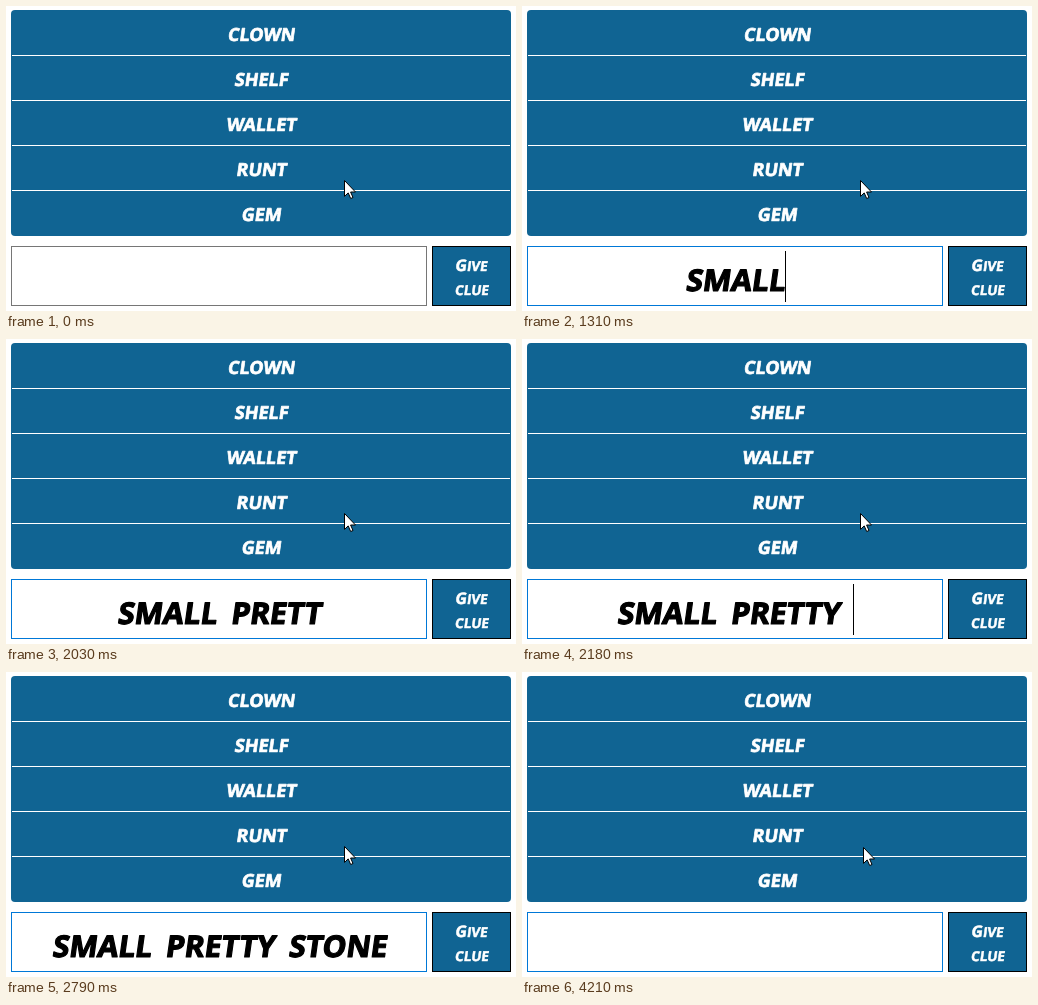
Recreate the animation shown at these times as an HTML page. Size 510 by 305 pixels, loop 4.28 s.

```html
<!DOCTYPE html>
<html lang="en">
<head>
<meta charset="utf-8">
<title>Word clue game</title>
<style>
  html, body { margin: 0; width: 100%; height: 100%; overflow: hidden; background: #fff; }
  svg { display: block; width: 510px; height: 305px; }
  text {
    font: 700 18px "Open Sans", "Noto Sans", sans-serif;
    text-anchor: middle;
    fill: currentColor;
    stroke: currentColor;
    stroke-width: .04em;
    stroke-linejoin: round;
  }
  .light { color: #fff; }
  .button text { font-size: 13.5px; }
  .button .cap { font-size: 16px; }
  #clue { font-size: 30px; word-spacing: 6px; color: #000; }
</style>
</head>
<body>
<svg viewBox="0 0 510 305">
  <rect x="5" y="4" width="500" height="226" rx="4" fill="#106493"/>
  <g id="words" class="light"></g>
  <rect id="field" x="5.5" y="240.5" width="415" height="59" fill="#fff"/>
  <text id="clue" transform="translate(213 285) skewX(-8)"></text>
  <rect id="caret" y="245" width="1" height="51"/>
  <g class="button light">
    <rect x="426.5" y="240.5" width="78" height="59" fill="#106493" stroke="#000"/>
    <text transform="translate(465 265) skewX(-8)"><tspan class="cap">G</tspan>IVE</text>
    <text transform="translate(465.5 289) skewX(-8)">CLUE</text>
  </g>
  <path id="pointer" d="M.5 .5V16.4L4.2 12.9L6.7 18.5L9 17.5L6.6 12H11.5Z" fill="#fff" stroke="#000"/>
</svg>
<script>
const LOOP = 4280;
const FOCUS = 150, SUBMIT = 3510, POINTER_MOVE = 4210;
const PHRASE = 'SMALL PRETTY STONE'.replaceAll(' ', '\u00a0');
// When each character of the phrase is typed.
const KEYS = [930, 1010, 1080, 1230, 1310, 1480, 1630, 1700, 1780, 1860,
              2030, 2110, 2180, 2250, 2330, 2330, 2410, 2490];
const CARET_ON = [[150, 700], [1160, 1700], [2180, 2790], [3340, 3890]];

const [words, field, clue, caret, pointer] =
  ['words', 'field', 'clue', 'caret', 'pointer'].map(id => document.getElementById(id));

words.innerHTML = ['CLOWN', 'SHELF', 'WALLET', 'RUNT', 'GEM'].map((word, i) =>
  (i ? `<path d="M6 ${4.5 + 45 * i}H504" stroke="#fff"/>` : '') +
  `<text transform="translate(255 ${35 + 45 * i}) skewX(-8)">${word}</text>`).join('');

function draw(t) {
  const typed = t < SUBMIT ? KEYS.filter(key => key <= t).length : 0;
  clue.textContent = PHRASE.slice(0, typed);
  const width = typed ? clue.getComputedTextLength() : 0;
  caret.setAttribute('x', Math.round(213 + width / 2));
  caret.setAttribute('visibility',
    CARET_ON.some(([on, off]) => t >= on && t < off) ? 'visible' : 'hidden');
  field.setAttribute('stroke', t < FOCUS ? '#767676' : '#0078d7');
  pointer.setAttribute('transform', t < POINTER_MOVE ? 'translate(338 174)' : 'translate(341 175)');
}

const start = performance.now();
function tick() {
  draw((performance.now() - start) % LOOP);
  requestAnimationFrame(tick);
}
tick();
</script>
</body>
</html>
```
